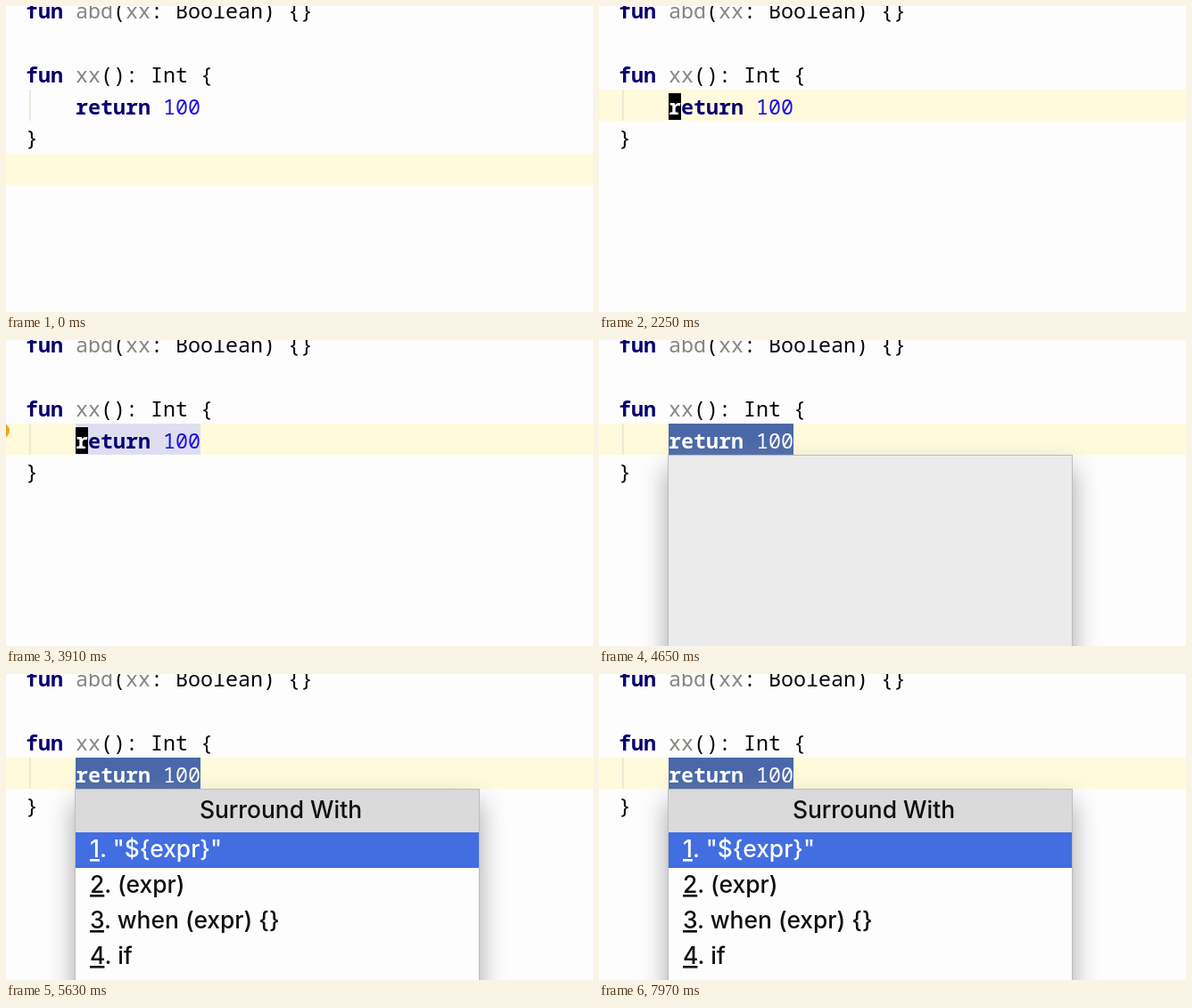
Animation, 658 px wide and 344 px high, one loop 7.99 s. Source, as an HTML page:

```html
<!DOCTYPE html>
<html lang="en">
<head>
<meta charset="utf-8">
<title>Surround selection</title>
<style>
html, body { margin: 0; width: 100%; height: 100%; overflow: hidden; background: #fdfdfd; }
svg { display: block; width: 100%; height: 100%; }
text { white-space: pre; }
.code { font: 500 23.33px "Noto Sans Mono", "DejaVu Sans Mono", monospace; fill: #080808; }
.kw { font-weight: 700; fill: #080070; }
.fn { fill: #868680; }
.num { fill: #1a10e0; }
.picked, .picked .kw, .picked .num { fill: #fdfdfd; }
.menu { font: 500 26.4px Inter, "Open Sans", sans-serif; fill: #101010; }
.key { text-decoration: underline; text-decoration-thickness: 2px; text-underline-offset: 3px; }
</style>
</head>
<body>
<svg viewBox="0 0 658 344" preserveAspectRatio="none">
  <defs>
    <filter id="soft" x="-20%" y="-20%" width="140%" height="140%">
      <feGaussianBlur stdDeviation="14"/>
    </filter>
  </defs>
  <rect width="658" height="344" fill="#fdfdfd"/>
  <rect id="row" width="658" height="35" fill="#fffadc"/>
  <rect id="guide" x="26" y="94" width="1.5" height="35"/>
  <rect id="range" x="78" y="94" width="140" height="35"/>
  <circle id="bulb" cx="-5" cy="102" r="9" fill="#efa31a"/>
  <g class="code">
    <text x="22" y="14"><tspan class="kw">fun</tspan> <tspan class="fn">abd</tspan>(<tspan class="fn">xx</tspan>: Boolean) {}</text>
    <text x="22" y="86"><tspan class="kw">fun</tspan> <tspan class="fn">xx</tspan>(): Int {</text>
    <text id="body" x="78" y="122"><tspan class="kw">return</tspan> <tspan class="num">100</tspan></text>
    <text x="22" y="157">}</text>
  </g>
  <rect id="caret" width="14" height="30"/>
  <g id="under" class="code picked"><text x="78" y="122"><tspan class="kw">r</tspan></text></g>
  <g id="popup">
    <rect x="76" y="144" width="456" height="270" fill="#a8a8a8" filter="url(#soft)"/>
    <rect x="77.5" y="129.5" width="453" height="240" fill="#ebebeb" stroke="#bcbcbc"/>
    <g id="list" class="menu">
      <rect x="78" y="130" width="452" height="48" fill="#dadada"/>
      <rect x="78" y="178" width="452" height="170" fill="#fdfdfd"/>
      <rect x="78" y="178" width="452" height="40" fill="#426ee2"/>
      <text x="308" y="162" text-anchor="middle">Surround With</text>
    </g>
  </g>
</svg>
<script>
const LOOP = 7990;
const LINE = 36;
const TIMES = {
  caret: 290, up1: 560, up2: 780, word: 1480,
  select: 3170, bulb: 3690, popup: 4570, list: 4750
};
const $ = id => document.getElementById(id);
const set = (el, attrs) => {
  for (const k in attrs) el.setAttribute(k, attrs[k]);
};
const show = (id, on) => set($(id), { visibility: on ? "inherit" : "hidden" });
const make = name => document.createElementNS("http://www.w3.org/2000/svg", name);

['"${expr}"', "(expr)", "when (expr) {}", "if"].forEach((label, i) => {
  const item = make("text");
  const key = make("tspan");
  set(item, { x: 94, y: 206 + i * 40, class: i ? "" : "picked" });
  set(key, { class: "key" });
  key.textContent = i + 1;
  item.append(key, ". " + label);
  $("list").append(item);
});

function draw(t) {
  const past = name => t >= TIMES[name];
  const line = past("up2") ? 3 : past("up1") ? 4 : 5;
  const top = line * LINE - 14;
  const open = past("popup");
  const atWord = past("word");

  set($("row"), { y: top });
  set($("guide"), { fill: line === 3 ? "#e6e4d4" : "#e0e4d0" });
  set($("caret"), { x: atWord ? 78 : 8, y: top + 4 });
  show("caret", past("caret") && !open);
  show("under", atWord && !open);

  set($("range"), { fill: open ? "#4a68a8" : "#dedef0" });
  show("range", past("select"));
  set($("body"), { class: open ? "picked" : "" });
  show("bulb", past("bulb") && !open);

  show("popup", open);
  show("list", past("list"));
}

const start = performance.now();
function tick() {
  draw((performance.now() - start) % LOOP);
  requestAnimationFrame(tick);
}
draw(0);
requestAnimationFrame(tick);
</script>
</body>
</html>
```
